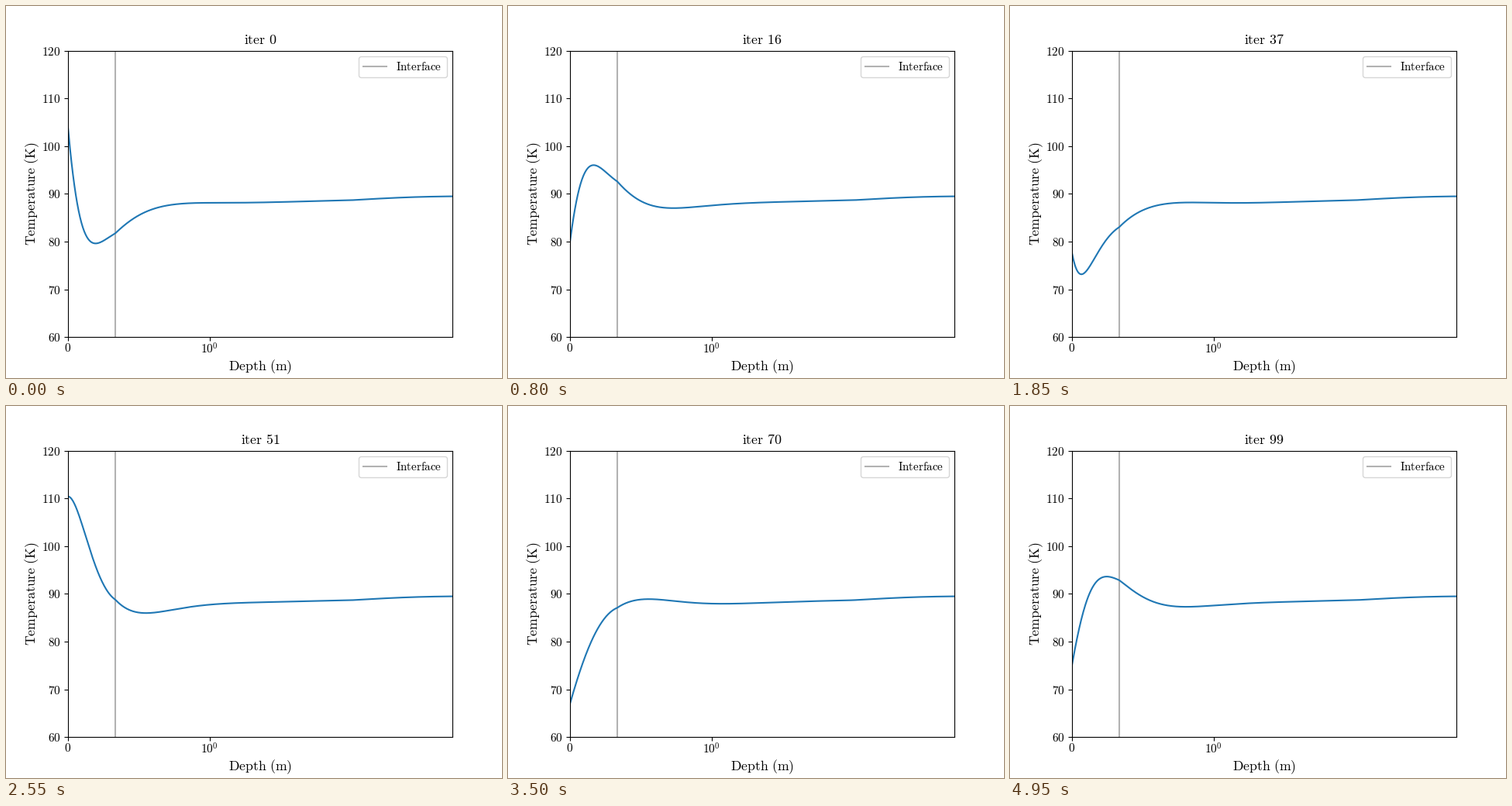
Recreate the animation shown at these times as a matplotlib script. Size 640 px wide and 480 px high, loop 5 s.

```python
import numpy as np
import matplotlib.pyplot as plt
from matplotlib.animation import FuncAnimation

plt.rcParams.update({
    "mathtext.fontset": "cm",
    "axes.titlesize": 12.9,
    "axes.labelsize": 12.8,
    "xtick.labelsize": 11,
    "ytick.labelsize": 11,
    "xtick.major.pad": 1.4,
    "legend.fontsize": 10.8,
})

FRAMES = 100
PERIOD = 40.3          # frames per day
INTERFACE = 0.334      # depth of the layer boundary, m
SKIN_TOP, SKIN_DEEP = 0.171, 0.23
REFLECT = 0.38         # thermal wave reflection at the boundary
BASE = 87.1            # mean temperature near the top, K

# Surface temperature over one day: (phase, K)
DAY = np.array([
    (0, 103.9), (2, 112.8), (4.4, 118.8), (6.3, 120), (8.5, 117.8),
    (10.7, 110.4), (12.7, 100.3), (14.7, 86.8), (16, 80), (18.4, 75.1),
    (22, 71.6), (25.7, 69), (29.7, 67), (33, 65.7), (35, 65.1), (37, 77.6),
])


def surface(t):
    """Periodic monotone cubic through the points of DAY."""
    x = np.append(DAY[:, 0], PERIOD)
    y = np.append(DAY[:, 1], DAY[0, 1])
    width = np.diff(x)
    rise = np.diff(y) / width
    before = np.roll(rise, 1)
    same = rise * before > 0
    slope = np.where(same, 2 * rise * before / np.where(same, rise + before, 1), 0)
    slope = np.append(slope, slope[0])
    i = np.searchsorted(x, t, side="right") - 1
    u = (t - x[i]) / width[i]
    return ((1 + 2 * u) * (1 - u) ** 2 * y[i] + u * (1 - u) ** 2 * width[i] * slope[i]
            + u * u * (3 - 2 * u) * y[i + 1] + u * u * (u - 1) * width[i] * slope[i + 1])


def damping(k, z):
    """Complex response at depth z to harmonic k of the surface."""
    q = (1 + 1j) * np.sqrt(k)
    thick = INTERFACE / SKIN_TOP
    scale = 1 + REFLECT * np.exp(-2 * q * thick)
    u = np.minimum(z, INTERFACE) / SKIN_TOP
    top = (np.exp(-q * u) + REFLECT * np.exp(-q * (2 * thick - u))) / scale
    return top * np.exp(-q * np.maximum(z - INTERFACE, 0) / SKIN_DEEP)


depth = np.linspace(0, 5, 1001)
samples = 512
coef = np.fft.rfft(surface(np.arange(samples) * PERIOD / samples)) / samples
order = np.arange(1, 81)
waves = 2 * coef[order, None] * damping(order[:, None], depth[None, :])
mean = (BASE + 2.42 * np.tanh((depth / 2.45) ** 1.25)
        + (coef[0].real - BASE) * np.exp(-depth / 0.15))


def profile(n):
    turn = np.exp(2j * np.pi * order * n / PERIOD)
    return mean + (turn @ waves).real


def roman(text):
    return r"$\mathrm{%s}$" % text.replace(" ", r"\ ")


fig, ax = plt.subplots(figsize=(6.4, 4.8), dpi=100)
ax.axvline(INTERFACE, color="k", alpha=0.3, label=roman("Interface"))
line, = ax.plot(depth, profile(0), color="C0")
ax.set_xscale("symlog")
ax.set_xlim(0, 5)
ax.set_ylim(60, 120)
ax.set_xticks([0, 1], ["$0$", "$10^0$"])
ax.minorticks_off()
levels = range(60, 121, 10)
ax.set_yticks(levels, [f"${v}$" for v in levels])
ax.set_xlabel(roman("Depth (m)"), labelpad=1.3)
ax.set_ylabel(roman("Temperature (K)"), labelpad=0.8)
title = ax.set_title(roman("iter 0"))
ax.legend(loc="upper right")


def draw(n):
    line.set_ydata(profile(n))
    title.set_text(roman(f"iter {n}"))
    return line, title


anim = FuncAnimation(fig, draw, frames=FRAMES, interval=50, repeat=True, repeat_delay=0)
plt.show()
```
